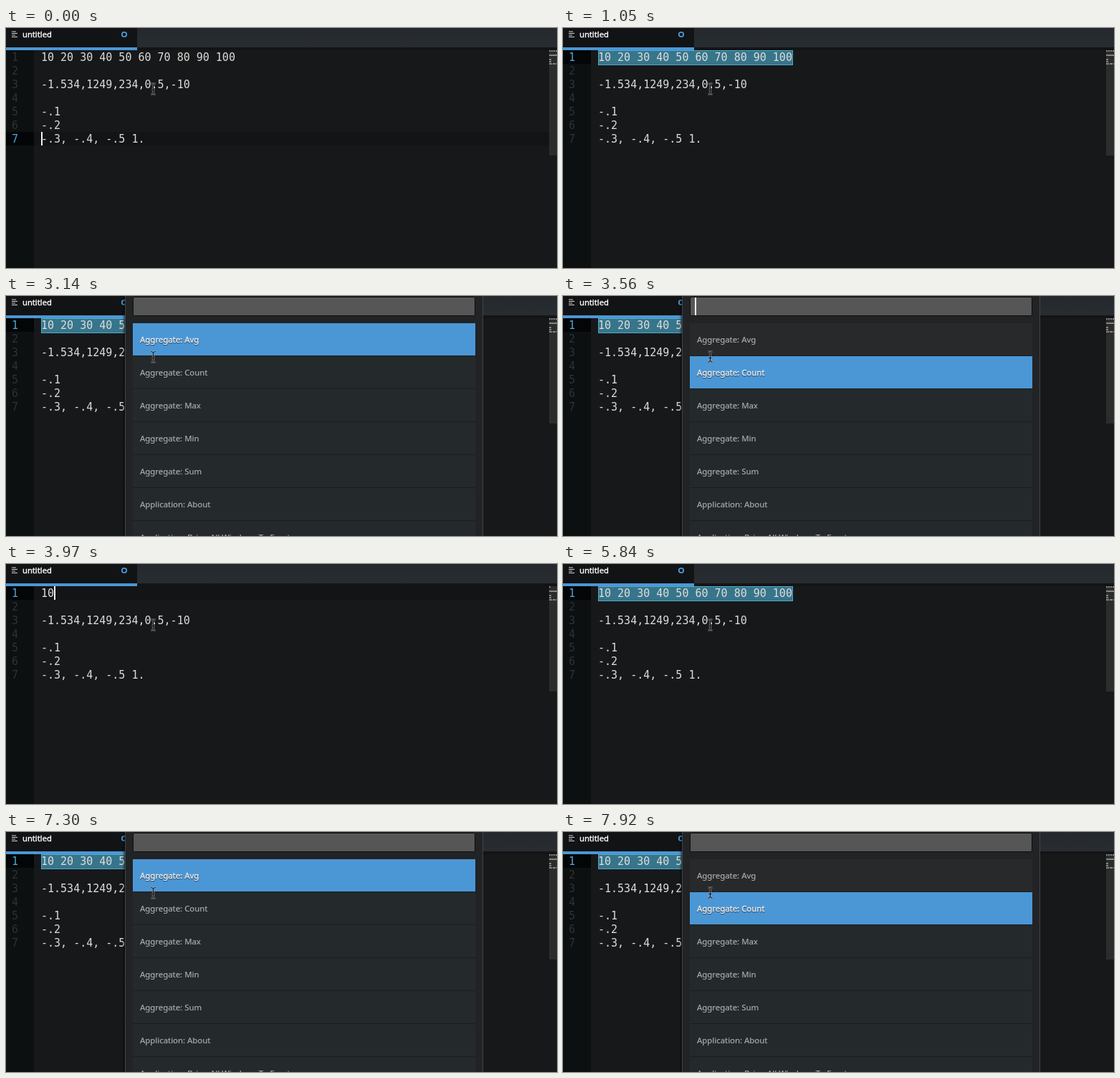
These frames come from a looping animation (769x335 px, 8000 ms). An HTML page:

```html
<!DOCTYPE html>
<html lang="en">
<head>
<meta charset="utf-8">
<title>Editor with command palette</title>
<style>
  html, body { margin: 0; width: 100%; height: 100%; overflow: hidden; background: #17181a; }
  svg { display: block; }
  text { white-space: pre; }
  .code { font: 15px "DejaVu Sans Mono", monospace; fill: #dcdcd8; }
  .num { fill: #2d3235; }
  .num.on { fill: #4fa5d8; }
  .ui { font: 11.4px "Noto Sans", "Open Sans", sans-serif; fill: #adb0b2; stroke: #adb0b2; stroke-width: .15px; }
  .ui.on { fill: #fff; stroke: #fff; stroke-width: .4px; text-shadow: 0 1px 1px #0008; }
  .tab { font-size: 11.2px; fill: #fff; stroke: #fff; stroke-width: .35px; }
</style>
</head>
<body>
<svg id="stage" width="769" height="335" viewBox="0 0 769 335">
  <defs>
    <linearGradient id="shade">
      <stop offset="0" stop-color="#000" stop-opacity="0"/>
      <stop offset="1" stop-color="#000" stop-opacity=".5"/>
    </linearGradient>
    <linearGradient id="bar" x2="0" y2="1">
      <stop offset="0" stop-color="#25292d"/>
      <stop offset="1" stop-color="#282d31"/>
    </linearGradient>
  </defs>
  <rect width="769" height="335" fill="#17181a"/>
  <rect y="31" width="39" height="304" fill="#0d1011"/>
  <g id="editor"></g>
  <g id="header">
    <rect width="769" height="27" fill="url(#bar)"/>
    <rect y="27" width="769" height="4" fill="#131416"/>
    <rect width="183" height="27" fill="#121315"/>
    <rect y="27" width="183" height="4" fill="#4b97d6"/>
    <path d="M8 5h6M8 7.5h8M8 10h5M8 12.5h8" stroke="#d0d2d3" stroke-width="1.2"/>
    <text class="ui tab" x="23" y="13">untitled</text>
    <circle cx="165" cy="9" r="3.2" fill="none" stroke="#4b97d6" stroke-width="1.8"/>
  </g>
  <g id="palette">
    <rect x="162" width="4" height="335" fill="url(#shade)"/>
    <rect x="166" width="500" height="335" fill="#424548"/>
    <rect x="167" width="498" height="335" fill="#212325"/>
    <rect x="177.5" y="1.5" width="477" height="26" rx="2" fill="#565656" stroke="#0d0e0f"/>
    <rect id="inputCaret" x="184" y="2" width="2" height="25" fill="#eee"/>
  </g>
  <g fill="none">
    <path id="beam" d="M202.5 77.5q3 0 3 3v9q0 3-3 3M208.5 77.5q-3 0-3 3v9q0 3 3 3M203.5 86.5h4" stroke="#aaa" stroke-opacity=".75" stroke-width="2.4"/>
    <use href="#beam" style="display:none"/>
    <path d="M202.5 77.5q3 0 3 3v9q0 3-3 3M208.5 77.5q-3 0-3 3v9q0 3 3 3M203.5 86.5h4" stroke="#0b0b0b"/>
  </g>
</svg>
<script>
const LOOP = 8000, ROW = 19, TOP = 31, LEFT = 49, CHAR = 9.03;
const NUMBERS = "10 20 30 40 50 60 70 80 90 100";
const LINES = [NUMBERS, "", "-1.534,1249,234,0.5,-10", "", "-.1", "-.2", "-.3, -.4, -.5 1."];
const COMMANDS = ["Aggregate: Avg", "Aggregate: Count", "Aggregate: Max", "Aggregate: Min",
  "Aggregate: Sum", "Application: About", "Application: Bring All Windows To Front"];

// Each step changes only the listed parts of the state.
const STEPS = [
  [0, { row: 6, col: 0, caret: 1, first: NUMBERS, selected: 0, pick: -1 }],
  [420, { row: 0 }],
  [1050, { selected: 1, caret: 0 }],
  [1890, { pick: 0 }],
  [2100, { caret: 1 }],
  [2520, { caret: 0 }],
  [2940, { caret: 1 }],
  [3140, { caret: 0 }],
  [3560, { pick: 1, caret: 1 }],
  [3970, { pick: -1, selected: 0, first: "10", col: 2 }],
  [4390, { caret: 0 }],
  [4800, { caret: 1 }],
  [5220, { caret: 0 }],
  [5430, { first: NUMBERS, col: 30, caret: 1 }],
  [5840, { selected: 1, caret: 0 }],
  [6470, { pick: 0 }],
  [6880, { caret: 1 }],
  [7300, { caret: 0 }],
  [7510, { pick: 1, caret: 1 }],
  [7920, { caret: 0 }]
];

const $ = id => document.getElementById(id);

function add(parent, tag, attrs, text = "") {
  const el = document.createElementNS("http://www.w3.org/2000/svg", tag);
  for (const key in attrs) el.setAttribute(key, attrs[key]);
  el.textContent = text;
  return parent.appendChild(el);
}

const rect = (parent, x, y, width, height, fill) => add(parent, "rect", { x, y, width, height, fill });
const show = (el, on) => el.style.display = on ? "" : "none";

const editor = $("editor"), palette = $("palette");
const lineGlow = rect(editor, 39, 0, 730, ROW, "#131416");
const gutterGlow = rect(editor, 0, 0, 39, ROW, "#040506");
const selection = rect(editor, 49.5, 31.5, 271, 20, "#37758b");
selection.setAttribute("stroke", "#50a9c8");

const numbers = [], codes = [];
LINES.forEach((line, i) => {
  const y = TOP + 15 + i * ROW;
  numbers.push(add(editor, "text", { class: "code num", x: 8, y }, i + 1));
  codes.push(add(editor, "text", { class: "code", x: LEFT, y }, line));
});
const textCaret = rect(editor, 0, 0, 2, ROW, "#f4f4f4");

// Minimap: one pixel per character, three per line.
rect(editor, 758, 31, 11, 147, "#2b2c2c");
const mapRows = LINES.map((line, i) => [...line.slice(0, 11)].map((ch, x) =>
  ch === " " ? null : rect(editor, 758 + x, TOP + i * 3, 1, 2, "#858681")));

const items = COMMANDS.map((name, i) => {
  const y = 38 + i * 46;
  const box = rect(palette, 177, y, 478, 45, "");
  rect(palette, 177, y + 45, 478, 1, "#1b1e20");
  const label = add(palette, "text", { class: "ui", x: 187, y: y + 27 }, name);
  return { box, label };
});

function stateAt(time) {
  const state = {};
  for (const [start, change] of STEPS) if (start <= time) Object.assign(state, change);
  return state;
}

function draw(s) {
  const open = s.pick >= 0, y = TOP + s.row * ROW;
  lineGlow.setAttribute("y", y);
  gutterGlow.setAttribute("y", y);
  show(lineGlow, !s.selected);
  show(selection, s.selected);
  numbers.forEach((el, i) => el.classList.toggle("on", i === s.row));
  codes[0].textContent = s.first;
  mapRows[0].forEach((dot, i) => dot && show(dot, i < s.first.length));
  textCaret.setAttribute("x", Math.round(LEFT + s.col * CHAR - (s.col > 2 ? 1 : 0)));
  textCaret.setAttribute("y", y);
  show(textCaret, s.caret && !open);
  show(palette, open);
  show($("inputCaret"), s.caret);
  items.forEach(({ box, label }, i) => {
    box.setAttribute("fill", i === s.pick ? "#4b97d6" : i ? "#24292c" : "#28292b");
    label.classList.toggle("on", i === s.pick);
  });
}

const began = performance.now();
function tick() {
  draw(stateAt((performance.now() - began) % LOOP));
  requestAnimationFrame(tick);
}
tick();
</script>
</body>
</html>
```
